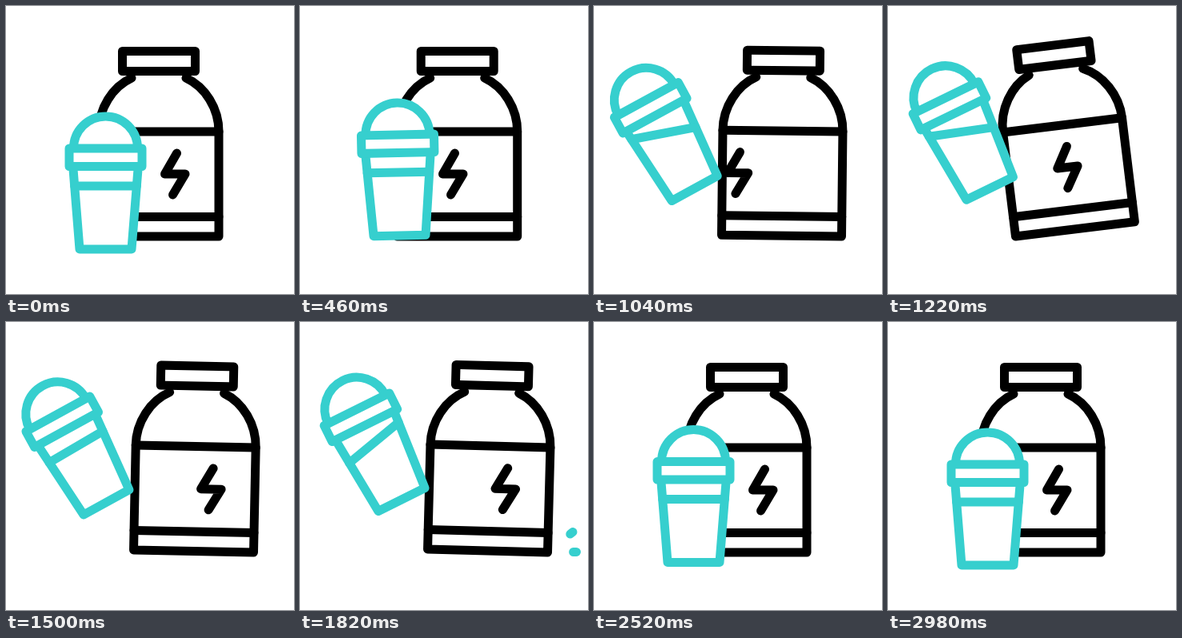
Recreate the animation shown at these times as an HTML page with a canvas. Size 360 by 360 pixels, loop 3.6 s.

```html
<!DOCTYPE html>
<html lang="en">
<head>
<meta charset="utf-8">
<title>Shaker and bottle</title>
<style>
  html, body { margin: 0; width: 100%; height: 100%; overflow: hidden; background: #fff; }
  canvas { display: block; width: 100vmin; height: 100vmin; }
</style>
</head>
<body>
<canvas id="stage"></canvas>
<script>
const SIZE = 360, LOOP = 3600, LINE = 11;
const BLACK = '#000', CYAN = '#36cfce';
const { PI, cos, min, max } = Math;
const canvas = document.getElementById('stage');
const ctx = canvas.getContext('2d');
const ratio = window.devicePixelRatio || 1;
canvas.width = canvas.height = SIZE * ratio;

const mix = (a, b, k) => a + (b - a) * k;
const rad = deg => deg * PI / 180;
const part = (t, a, b) => min(1, max(0, (t - a) / (b - a)));

// Smooth 0 to 1 from time a to b; arch goes up and back down.
const ease = (t, a, b) => (1 - cos(PI * part(t, a, b))) / 2;
const arch = (t, a, b) => (1 - cos(2 * PI * part(t, a, b))) / 2;

// The bottle tips over, then rocks from corner to corner until it settles.
function rock(t) {
  const swing = max(0, t - 840);
  return 10 * ease(t, 460, 840) * (1 - part(t, 840, 2240)) * cos(PI * swing / 420);
}

function bottlePose(t) {
  return {
    shift: 43.5 * (ease(t, 375, 735) - ease(t, 2110, 2460)),
    tilt: rock(t),
    bolt: -110 * (ease(t, 280, 840) - ease(t, 840, 1370))
  };
}

function cupPose(t) {
  const lift = ease(t, 300, 810) - ease(t, 2060, 2590);
  const turn = ease(t, 380, 1000) - ease(t, 2000, 2390);
  const shake = (1 - cos(4 * PI * part(t, 1000, 2000) * 1)) / 2;
  return {
    x: 124.5 + turn + 6 * arch(t, 560, 1060) + 1.8 * shake,
    y: 304 - lift * (76 + 6 * ease(t, 1220, 1820)),
    tilt: 2.9 * shake - 28.8 * turn,
    wave: 12.5 * ease(t, 460, 820) - 21.5 * ease(t, 1220, 1700)
      + 16 * ease(t, 1820, 2220) - 7 * ease(t, 2220, 2520)
  };
}

function line(...points) {
  ctx.beginPath();
  points.forEach(([x, y]) => ctx.lineTo(x, y));
  ctx.stroke();
}

function drawBottle(t) {
  const { shift, tilt, bolt } = bottlePose(t);
  const pivot = tilt > 0 ? 75 : -75;
  ctx.save();
  ctx.translate(191 + shift + pivot, 288);
  ctx.rotate(rad(tilt));
  ctx.translate(-pivot, 0);
  ctx.strokeStyle = BLACK;

  // The bolt slides around the label and is hidden past its edges.
  ctx.save();
  ctx.beginPath();
  ctx.rect(-75, -131, 150, 106);
  ctx.clip();
  ctx.translate(bolt, 0);
  line([22.5, -104], [7.5, -78], [33, -78], [17.5, -52]);
  ctx.restore();

  ctx.strokeRect(-45.5, -231.5, 91, 25);
  ctx.beginPath();
  ctx.moveTo(-34, -198);
  ctx.bezierCurveTo(-58, -187, -75, -160, -75, -131);
  ctx.lineTo(-75, 0);
  ctx.lineTo(75, 0);
  ctx.lineTo(75, -131);
  ctx.bezierCurveTo(75, -160, 58, -187, 34, -198);
  ctx.stroke();
  for (const y of [-131, -24.5]) line([-75, y], [75, y]);
  ctx.restore();
}

function drawCup(t) {
  const { x, y, tilt, wave } = cupPose(t);
  const side = h => 32.5 + h * 0.08;
  ctx.save();
  ctx.translate(x, y);
  ctx.rotate(rad(tilt));
  ctx.strokeStyle = CYAN;
  ctx.fillStyle = '#fff';

  ctx.beginPath();
  ctx.moveTo(-side(104), -104);
  ctx.lineTo(-side(0), 0);
  ctx.lineTo(side(0), 0);
  ctx.lineTo(side(104), -104);
  ctx.fill();
  ctx.stroke();

  const left = 79 + wave, right = 79 - wave;
  line([-side(left), -left], [side(right), -right]);

  ctx.beginPath();
  ctx.arc(0, -126, 40, PI, 0);
  ctx.fill();
  ctx.stroke();
  ctx.fillRect(-45.5, -126, 91, 22.5);
  ctx.strokeRect(-45.5, -126, 91, 22.5);
  ctx.restore();
}

function drawDashes(t) {
  const head = ease(t, 1520, 1660), tail = ease(t, 1620, 1900);
  if (head <= tail) return;
  ctx.strokeStyle = CYAN;
  const dash = (x0, y0, x1, y1) => line(
    [mix(x0, x1, tail), mix(y0, y1, tail)],
    [mix(x0, x1, head), mix(y0, y1, head)]);
  dash(324, 276, 341, 262.5);
  dash(325, 288, 345.5, 287.5);
}

function frame(now) {
  const t = now % LOOP;
  ctx.setTransform(ratio, 0, 0, ratio, 0, 0);
  ctx.fillStyle = '#fff';
  ctx.fillRect(0, 0, SIZE, SIZE);
  ctx.lineWidth = LINE;
  ctx.lineCap = ctx.lineJoin = 'round';
  drawBottle(t);
  drawCup(t);
  drawDashes(t);
}

let start = null;
function tick(now) {
  if (start === null) start = now;
  frame(now - start);
  requestAnimationFrame(tick);
}
frame(0);
requestAnimationFrame(tick);
</script>
</body>
</html>
```
